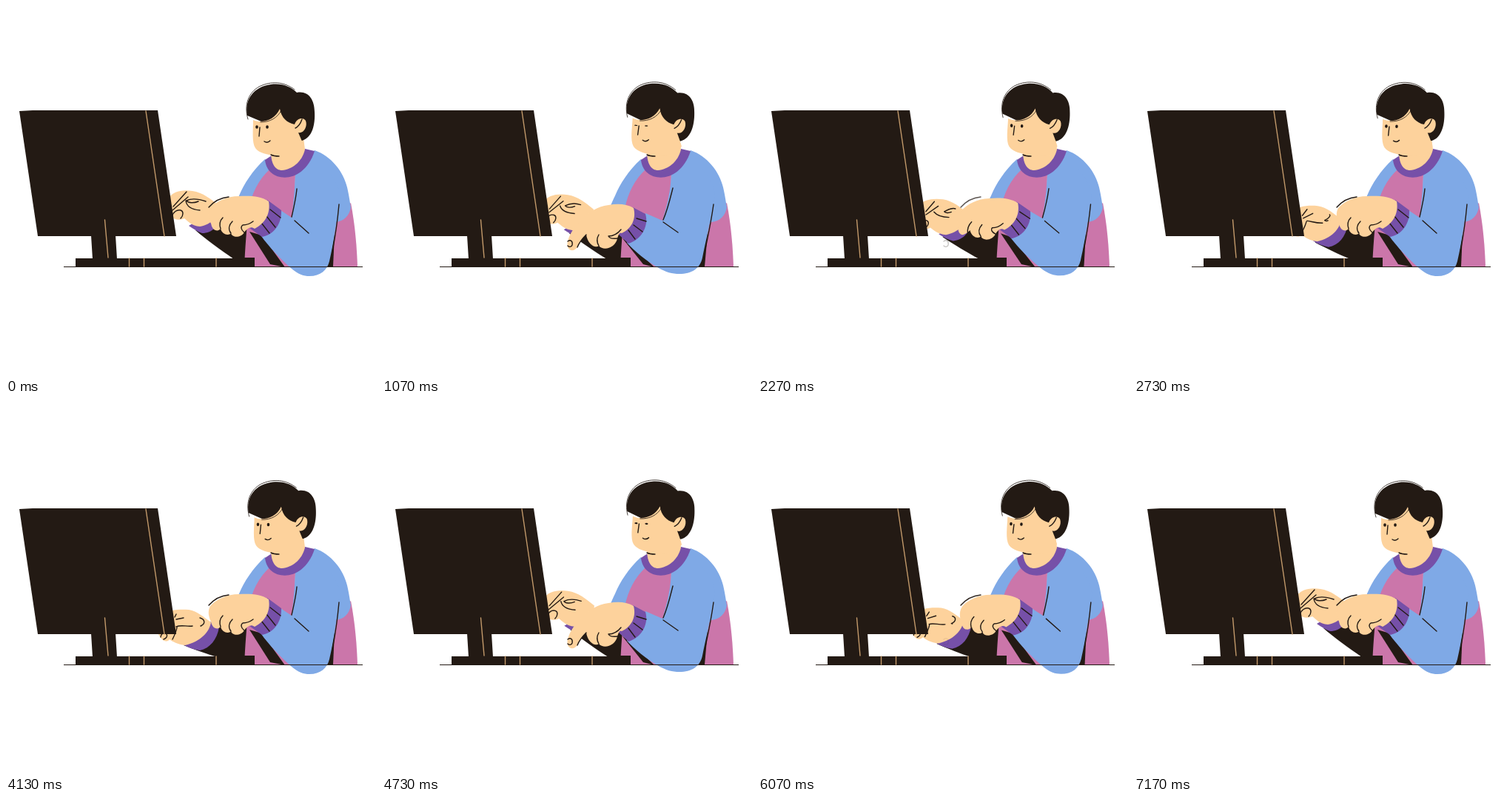
An HTML page with a canvas that plays this animation: 500x500 px, repeating every 7210 ms.

```html
<!DOCTYPE html>
<html lang="en">
<head>
<meta charset="utf-8">
<title>Typing at a desk</title>
<style>
html, body { margin: 0; width: 100%; height: 100%; overflow: hidden; background: #fff; }
canvas { display: block; width: 500px; height: 500px; }
</style>
</head>
<body>
<canvas id="stage" width="500" height="500"></canvas>
<script>
const ctx = document.getElementById('stage').getContext('2d');
const LOOP = 7210, CYCLE = LOOP / 2;
const INK = '#231a14', SKIN = '#fdd29c', BLUE = '#7fa9e6',
      PINK = '#cb76aa', PURPLE = '#7650a8', TAN = '#c39a6b';

const smooth = x => x * x * (3 - 2 * x);

// Eased value at time t along [time, value] keys
function track(keys, t) {
  for (let i = 1; i < keys.length; i++) {
    const [t0, v0] = keys[i - 1], [t1, v1] = keys[i];
    if (t <= t1) return v0 + (v1 - v0) * smooth((t - t0) / (t1 - t0));
  }
  return keys[keys.length - 1][1];
}

// Blend two path strings of the same structure
function mix(a, b, k) {
  const to = b.match(/-?[\d.]+/g);
  let i = 0;
  return a.replace(/-?[\d.]+/g, n => (+n + (to[i++] - n) * k).toFixed(2));
}

function fill(d, color) {
  ctx.fillStyle = color;
  ctx.fill(new Path2D(d));
}

function line(d, color = INK, width = 1.4) {
  ctx.strokeStyle = color;
  ctx.lineWidth = width;
  ctx.stroke(new Path2D(d));
}

const frontKeys = [[0, 0], [570, 0], [960, 1], [1500, 1], [2650, 0], [CYCLE, 0]];
const backKeys = [[0, 0], [500, 1], [600, 1], [1250, 0], [2050, 0], [2560, 1], [3050, 0], [CYCLE, 0]];
const headKeys = [[0, 0], [1500, 1], [CYCLE, 0]];
const blinkKeys = [[0, 0], [950, 0], [1060, 1], [1090, 1], [1200, 0], [CYCLE, 0]];

const back = {
  sleeve: ['M256 303 C270 315 290 330 308 342 L327 342 L327 285 L284 292 Z',
           'M240 326 C255 332 272 338 286 342 L327 342 L327 285 L284 298 Z'],
  cuff: ['M247 297 C253 301 259 305 265 307 C279 307 288 297 291 279 L283 272 L262 288 Z',
         'M240 325 C247 330 255 332 262 333 C276 330 285 318 288 302 L276 294 L264 312 Z'],
  hand: ['M218 262 C225 250 238 248 252 250 C266 252 277 261 288 270 C287 284 277 296 262 298 C251 297 246 291 241 287 C236 289 229 290 224 285 C219 280 215 274 218 262 Z',
         'M211 285 C220 278 234 277 247 278 C259 280 267 288 277 295 C275 308 263 321 242 326 C232 325 225 321 221 318 C218 322 213 321 210 317 C203 310 202 296 211 285 Z'],
  lines: ['M244 251 L226 271 M246 258 L225 276 M270 264 C258 260 250 260 244 263 C246 266 253 267 260 264 M243 263 C244 271 250 275 262 276 M224 285 C226 278 231 275 236 276 C240 277 240 283 236 287',
          'M230 284 L228 288 M240 289 L230 291 M262 289 C269 291 270 297 263 300 C264 300 264 300 263 300 M230 301 C236 298 244 301 252 300 M209 315 C210 309 215 308 217 311 C219 314 216 317 213 318 M231 302 C230 308 227 314 225 318']
};
// The last crease only shows on the lowered hand
back.lines[0] += ' M238 264 C235 271 231 276 229 280';

const front = {
  shade: ['M329 305 L357 349 L377 353 L346 310 Z', 'M325 314 L353 349 L368 353 L333 319 Z'],
  side: ['M445 286 L466 266 C472 298 474 325 475 352 L442 352 Z',
         'M442 286 L466 266 C472 298 474 325 475 352 L436 352 Z'],
  arm: ['M391 228 C390 250 388 270 386 286 L371 276 L345 311 C355 325 372 343 386 355 C396 363 402 365 410 365 C425 365 434 357 437 345 C442 325 447 290 451 262 C455 240 430 220 417 196 Z',
        'M391 228 C390 250 385 270 379 290 L356 280 L331 320 C341 331 358 345 372 353 C384 360 392 362 402 362 C418 362 430 355 433 340 C437 320 444 290 449 262 C455 240 430 220 417 196 Z'],
  folds: ['M393 247 C392 259 389 272 386 285 M390 290 L409 307 M450 268 C448 291 445 311 441 332',
          'M393 246 C389 262 386 275 380 289 M380 292 L400 306 M448 268 C445 290 441 309 437 328'],
  cuff: ['M353 262 L372 276 C373 293 363 309 346 312 L329 300 C345 295 355 281 353 262 Z',
         'M339 272 L356 281 C361 298 350 316 333 321 L319 308 C333 303 341 290 339 272 Z'],
  ribs: ['M357 275 L371 286 M352 284 L364 299 M345 293 L356 307',
         'M344 287 L357 291 M340 296 L352 305 M333 303 L342 315'],
  hand: ['M355 264 C345 257 330 256 315 257 C298 257 284 264 276 273 C272 280 274 288 277 294 C278 299 280 302 283 303 C286 304 288 303 290 301 C292 309 301 311 304 307 C306 314 318 313 322 306 C326 301 330 297 336 301 C350 294 358 280 355 264 Z',
         'M340 273 C330 267 318 267 306 269 C290 271 280 279 272 286 C262 296 254 306 251 318 C248 330 258 334 264 326 C267 318 271 314 276 309 C278 322 288 328 293 324 C300 332 316 326 318 314 C320 308 321 306 324 307 C337 301 344 288 340 273 Z'],
  lines: ['M290 301 C288 295 289 290 293 286 M304 307 C300 302 301 296 306 291 M322 306 C317 302 317 298 320 296 C325 296 330 294 334 291',
          'M264 326 C267 318 271 314 276 309 M293 324 C290 319 290 314 293 309 M318 314 C310 315 307 313 306 311 C313 311 319 307 323 302']
};

function drawBack(k) {
  const part = name => mix(back[name][0], back[name][1], k);
  fill(part('sleeve'), INK);
  fill(part('cuff'), PURPLE);
  fill(part('hand'), SKIN);
  line(part('lines').replace(/ M[^M]*$/, k > .5 ? '$&' : ''));
}

function drawTorso(k) {
  fill('M350 207 C333 222 321 242 316 254 C312 263 309 268 308 274 L312 287 L345 287 L365 222 Z', BLUE);
  fill('M357 220 C342 234 332 252 328 275 C325 300 323 330 322 352 L400 352 L390 300 L391 226 Z', PINK);
  fill('M446 290 L422 352 L445 352 Z', INK);
  fill(mix(...front.side, k), PINK);
  fill('M417 195 C440 203 456 224 461 245 C464 258 465 267 466 272 C464 283 457 291 445 292 L436 300 L390 280 L391 226 Z', BLUE);
  fill(mix(...front.shade, k), INK);
  fill(mix(...front.arm, k), BLUE);
  line(mix(...front.folds, k));
  fill('M350 208 C353 240 402 243 417 196 L404 193 L359 202 Z', PURPLE);
  fill('M358 196 C358 214 364 222 373 222 C386 221 400 211 404 194 L401 170 L370 170 Z', SKIN);
}

function drawHead(k, blink) {
  ctx.save();
  ctx.translate(385 + 2.7 * k, 205);
  ctx.rotate(.06 * k);
  ctx.translate(-385, -205);
  fill('M326 148 C322 126 335 109 358 106 C373 104 385 109 393 117 C408 114 417 126 417 143 C418 160 414 178 400 182 L378 170 Z', INK);
  line('M327 153 C321 133 328 117 342 109 C358 101 376 102 390 113', INK, .8);
  fill('M334 154 C345 159 363 155 370 139 C372 151 380 158 390 160 C393 151 402 150 405 155 C408 163 402 173 395 171 C397 176 400 182 402 189 L393 202 L363 202 C354 201 342 199 337 192 C332 184 334 168 334 154 Z', SKIN);
  line('M344 157 C357 157 367 151 372 141', INK, .8);
  line('M343 164 L342 176');
  line('M349 183 C352 185 355 184 357 182');
  line('M400 153 C398 159 395 163 391 165');
  ctx.fillStyle = INK;
  for (const x of [339, 353]) {
    ctx.beginPath();
    ctx.ellipse(x, 163.5, 1.8 + .4 * blink, 2.3 - 1.6 * blink, 0, 0, 7);
    ctx.fill();
  }
  ctx.restore();
  line('M358 201 C362 203 366 203 369 203');
}

function drawFront(k) {
  fill(mix(...front.cuff, k), PURPLE);
  line(mix(...front.ribs, k));
  fill(mix(...front.hand, k), SKIN);
  line(mix(...front.lines, k));
  ctx.globalAlpha = 1 - k;
  line('M274 272 C281 264 290 259 301 258');
  ctx.globalAlpha = k;
  line('M251 318 C255 315 258 318 257 323 C256 326 253 326 251 324');
  ctx.globalAlpha = 1;
}

function drawDesk() {
  fill('M78 352 H482 V353 H78 Z', INK);
  fill('M94 341 H306 V340 H336 V352.5 H94 Z', INK);
  fill('M115 310 H148 L150 342 H117 Z', INK);
  fill('M18 142 L36 141 H205 L230 311 H43 Z', INK);
  line('M189 142 L214 311 M133.5 289 L138 340 M166.5 341 V352 M186.5 341 V352 M284 341 V352', TAN);
}

function draw(t) {
  const front = track(frontKeys, t);
  ctx.fillStyle = '#fff';
  ctx.fillRect(0, 0, 500, 500);
  drawBack(track(backKeys, t));
  drawTorso(front);
  drawHead(track(headKeys, t), track(blinkKeys, t));
  drawDesk();
  drawFront(front);
}

ctx.lineCap = ctx.lineJoin = 'round';
const start = performance.now();
function tick() {
  draw((performance.now() - start) % CYCLE);
  requestAnimationFrame(tick);
}
draw(0);
requestAnimationFrame(tick);
</script>
</body>
</html>
```
